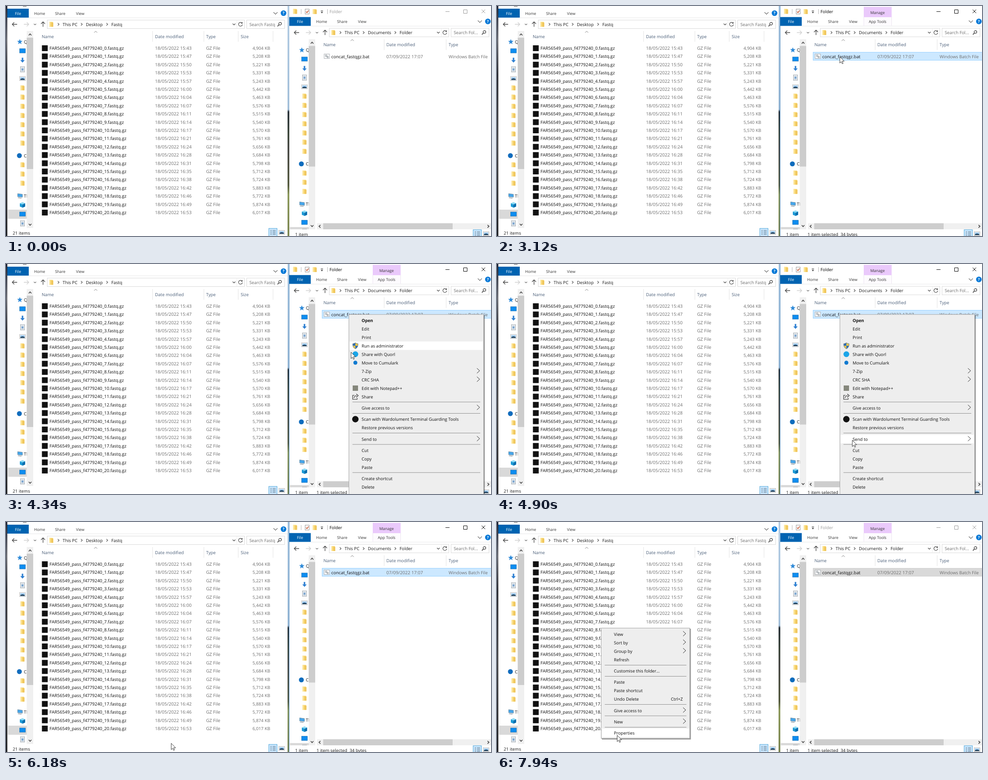
Animation of 1087x515 px, one loop 8000 ms. Source, as an HTML page:

```html
<!DOCTYPE html>
<html lang="en">
<head>
<meta charset="utf-8">
<title>Concatenate files</title>
<style>
html, body { margin: 0; width: 100%; height: 100%; overflow: hidden; background: #fff; }
svg { display: block; width: 100vw; height: 100vh; }
text { font: 9.75px "Open Sans", "Noto Sans", sans-serif; fill: #1a1a1a; white-space: pre; text-rendering: geometricPrecision; }
.tab { font-size: 8.7px; fill: #333; }
.tab.on { fill: #fff; }
.head { fill: #4c607a; }
.file { font-size: 9.9px; fill: #111; }
.num { font-size: 10.1px; fill: #6d6d6d; }
.dim { fill: #6d6d6d; }
.item { font-size: 9.6px; fill: #111; }
.bold { font-weight: 700; }
.mid { text-anchor: middle; }
.end { text-anchor: end; }
.title text { fill: currentColor; font-size: 9.6px; }
.line { fill: none; stroke: #444; stroke-width: 1.2; }

.title, .hover, .picked, .stale, .extra, .edge, .rowhover, .bar1, .bar2, .show {
  animation: 8s step-end infinite;
}
.title { animation-name: title; }
.hover { animation-name: hover; }
.picked { animation-name: picked; }
.stale { animation-name: stale; }
.extra { animation-name: extra; }
.edge { animation-name: edge; }
.rowhover { animation-name: rowhover; }
.bar1 { animation-name: bar1; }
.bar2 { animation-name: bar2; }
.show { animation-name: show; }
.menu1 { animation: menu1 8s linear infinite; }
.menu2 { animation: menu2 8s linear infinite; }
.cursor { animation: move 8s linear infinite; }

@keyframes title { 0% { color: #9a9a9a } 33.875% { color: #000 } 85%, 100% { color: #9a9a9a } }
@keyframes hover { 0% { opacity: 0 } 26.25% { opacity: 1 } 32.125%, 100% { opacity: 0 } }
@keyframes picked { 0% { opacity: 0 } 32.125% { opacity: 1 } 85%, 100% { opacity: 0 } }
@keyframes stale { 0% { opacity: 0 } 85%, 100% { opacity: 1 } }
@keyframes extra { 0% { opacity: 0 } 32.125%, 100% { opacity: 1 } }
@keyframes edge { 0% { opacity: 0 } 33.875% { opacity: 1 } 85%, 100% { opacity: 0 } }
@keyframes rowhover { 0% { opacity: 0 } 74.74% { opacity: 1 } 75.58%, 100% { opacity: 0 } }
@keyframes show { 0% { opacity: 0 } 11.5%, 100% { opacity: 1 } }
@keyframes menu1 {
  0% { opacity: 0 }
  40.6% { opacity: 0; animation-timing-function: steps(5) }
  45.75% { opacity: 1 }
  72.24% { opacity: 1 }
  72.25%, 100% { opacity: 0 }
}
@keyframes menu2 {
  0% { opacity: 0 }
  88.375% { opacity: 0; animation-timing-function: steps(5) }
  93.375%, 100% { opacity: 1 }
}
/* highlighted entry, as the centre of its row */
@keyframes bar1 {
  0% { transform: translateY(-99px) }
  51.62% { transform: translateY(126.5px) }
  52.5% { transform: translateY(145.5px) }
  53.37% { transform: translateY(164.5px) }
  54.24% { transform: translateY(183px) }
  55.12% { transform: translateY(202px) }
  56% { transform: translateY(221px) }
  56.87% { transform: translateY(240px) }
  57.75% { transform: translateY(278px) }
  58.62% { transform: translateY(297px) }
  59.5% { transform: translateY(322px) }
  60.37% { transform: translateY(366.5px) }
  61.24% { transform: translateY(392px) }
  63% { transform: translateY(417.5px) }
  63.87%, 100% { transform: translateY(436px) }
}
@keyframes bar2 { 0% { opacity: 0 } 98.36%, 100% { opacity: 1 } }
@keyframes move {
  0% { transform: translate(987px, 503px) }
  11.5% { transform: translate(987px, 503px); animation-timing-function: steps(5) }
  15.8% { transform: translate(855px, 310px); animation-timing-function: steps(5) }
  20.1% { transform: translate(787px, 196px); animation-timing-function: steps(1) }
  21% { transform: translate(783px, 179px); animation-timing-function: steps(4) }
  24.5% { transform: translate(774px, 130px); animation-timing-function: steps(3) }
  27.12% { transform: translate(768px, 113px) }
  49.87% { transform: translate(768px, 113px); animation-timing-function: steps(5) }
  54.24% { transform: translate(773px, 197px); animation-timing-function: steps(7) }
  60.37% { transform: translate(797px, 378px); animation-timing-function: steps(1) }
  61.24% { transform: translate(796px, 394px); animation-timing-function: steps(4) }
  64.74% { transform: translate(804px, 441px) }
  72.25% { transform: translate(804px, 441px); animation-timing-function: steps(6) }
  77.24% { transform: translate(370px, 495px); animation-timing-function: steps(5) }
  81.62% { transform: translate(248px, 495px); animation-timing-function: steps(1) }
  82.5% { transform: translate(233px, 484px) }
  97.5% { transform: translate(233px, 484px); animation-timing-function: steps(2) }
  99.24%, 100% { transform: translate(269px, 477px) }
}
</style>
</head>
<body>
<svg id="stage" viewBox="0 0 1087 515" preserveAspectRatio="none"></svg>
<script>
// Text is placed by the vertical centre of its capitals.
const text = (x, y, s, cls = '') => `<text x="${x}" y="${y + 3.5}" class="${cls}">${s}</text>`;
const rect = (x, y, w, h, fill, more = '') => `<rect x="${x}" y="${y}" width="${w}" height="${h}" fill="${fill}" ${more}/>`;
const path = (d, fill, more = '') => `<path d="${d}" fill="${fill}" ${more}/>`;
const line = (d, color = '#444', w = 1.2) => path(d, 'none', `stroke="${color}" stroke-width="${w}"`);
const dot = (r, fill) => `<circle r="${r}" fill="${fill}"/>`;
const at = (x, y, s, turn = 0) => `<g transform="translate(${x} ${y}) rotate(${turn})">${s}</g>`;

const icon = {
  folder: rect(-4.5, -5.5, 8, 11, '#f9d978') + path('M0 -4H4.5V5.5H0Z', '#f0c75e') + rect(-4.5, -5.5, 2, 11, '#fde9a6'),
  star: path('M0 -6L1.6 -2 6 -1.8 2.6 1 3.8 5.4 0 3 -3.8 5.4 -2.6 1 -6 -1.8 -1.6 -2Z', '#2f8ad8'),
  screen: rect(-6.5, -5, 13, 9.5, '#0d8df0', 'stroke="#1d6fae" stroke-width=".8"'),
  down: path('M-1.7 -5.5H1.7V0H5L0 5.5 -5 0H-1.7Z', '#2f80d2'),
  doc: rect(-4.5, -6, 9, 12, '#fff', 'stroke="#8b949c" stroke-width=".9"') + line('M-3 -3H3M-3 3.5H3', '#7d99b5', 1) + rect(-2.5, -1.5, 5, 3.5, '#6d9bc9'),
  photo: rect(-6.5, -4.5, 13, 9, '#fff', 'stroke="#a5a5a5" stroke-width=".8"') + rect(-5, -3, 10, 6, '#9fcbf0') + path('M-5 3V1L0 -.5 5 1V3Z', '#1e3f5a'),
  cube: path('M0 -6L6 -3.5V3.5L0 6 -6 3.5V-3.5Z', '#1c9ad6') + path('M0 -6L6 -3.5 0 -1 -6 -3.5Z', '#8fdcf5') + path('M0 -1L6 -3.5V3.5L0 6Z', '#0f6fae'),
  pc: path('M-5 -5L6 -3.5V3L-5 2Z', '#45a5ea', 'stroke="#7c8d99" stroke-width=".8"') + path('M-3 3.5L5 4.5 3 6 -5 5Z', '#9aa5ad'),
  cloud: dot(5.5, '#0f6cbd'),
  arrow: line('M-5.5 0H5.5M-1 -4.5L-5.5 0 -1 4.5', 'currentColor', 1.3),
  chev: line('M-2 -3.5L1.8 0 -2 3.5'),
  find: line('M-.8 .8L-4.5 4.5', '#333', 1.6) + `<circle cx="1.3" cy="-1.3" r="3" class="line" style="stroke:#333"/>`,
  reload: line('M3 -3.2A4.3 4.3 0 1 0 4.3 .5M4 -5V-2H1', '#444', 1.2),
  help: dot(6.3, '#0078d7') + `<text class="mid bold" y="3.4" style="fill:#fff;font-size:9px">?</text>`,
  gears: rect(-6, -5, 12, 10, '#fff', 'stroke="#a0a5aa" stroke-width=".9"') + `<circle cx="-1.5" cy="-1" r="1.8" class="line" style="stroke:#8c949a"/><circle cx="2" cy="1.8" r="1.5" class="line" style="stroke:#8c949a"/>`,
  zip: rect(-6.5, -6.5, 13, 13, '#111'),
  shield: path('M0 -6.5Q3 -4.5 6 -4.5 6.5 3.5 0 7Z', '#f3c84a') + path('M0 -6.5Q-3 -4.5 -6 -4.5 -6.5 3.5 0 7Z', '#2e6fb7') + path('M0 0H5.8Q4.8 4.5 0 7Z', '#2e6fb7') + path('M0 0H-5.8Q-4.8 4.5 0 7Z', '#f3c84a') + path('M0 -6.5Q3 -4.5 6 -4.5 6.5 3.5 0 7 -6.5 3.5 -6 -4.5 -3 -4.5 0 -6.5Z', 'none', 'stroke="#6b7a86" stroke-width="1"'),
  share: line('M-2 -3H-6V6H4V3M-3 3Q-2 -2 3 -2.5M2 -6L6.5 -2.5 2 1.5', '#222', 1.1)
};

// k moves what hangs on the right edge, b what hangs on the bottom edge.
function pane({ k, b, crumbs, find, cols, rules, thumb, chosen }) {
  let s = rect(3, 0, 628 + k, 520, '#fff');

  s += rect(3, 6, 48, 20, '#0063b1') + text(20, 16, 'File', 'tab on');
  s += text(63, 16, 'Home', 'tab') + text(110, 16, 'Share', 'tab') + text(157, 16, 'View', 'tab');
  s += line(`M51 26.5H${631 + k}`, '#e6e7e8', 1);
  s += at(604 + k, 16, line('M-4.5 -2L0 2.5 4.5 -2', '#666', 1.1)) + at(622 + k, 16, icon.help);

  s += `<g color="#444">${at(19.5, 41, icon.arrow)}${at(83, 41, icon.arrow, 90)}</g>`;
  s += `<g color="#d0d0d0">${at(45.5, 41, icon.arrow, 180)}</g>`;
  s += at(65, 41, line('M-2.5 -1.2L0 1.3 2.5 -1.2', '#555', 1.1));
  s += rect(92.5, 31.5, 442 + k, 19, '#fff', 'stroke="#d9d9d9"') + line(`M517.5 31.5V50.5`.replace('517.5', 517.5 + k), '#ececec', 1);
  s += at(101.5, 41, icon.folder);
  crumbs.forEach(([x, name]) => s += at(x - 9.5, 41, at(0, 0, line('M-1.5 -2.8L1.5 0 -1.5 2.8', '#444', 1.1))) + text(x, 41, name));
  s += at(511 + k, 41, line('M-3 -1.5L0 1.5 3 -1.5', '#444', 1.2)) + at(525.5 + k, 41, icon.reload);
  s += rect(539.5 + k, 31.5, 85, 19, '#fff', 'stroke="#d9d9d9"') + text(545.5 + k, 41, find, 'dim') + at(613 + k, 41, icon.find);

  s += rect(4, chosen, 43, 20.5, '#d9d9d9');
  const tree = ['star', 'screen', 'down', 'doc', 'photo'];
  tree.forEach((n, i) => s += at(i ? 37 : 31, 80 + 20.6 * i, icon[n]));
  for (let i = 0; i < 7; i++) s += at(37, 183.3 + 20.6 * i, icon.folder);
  s += at(30, 335, icon.cloud);
  for (let i = 0; i < 3; i++) s += at(37, 355.5 + 20.6 * i, icon.folder);
  ['pc', 'cube', 'screen', 'doc'].forEach((n, i) => s += at(i ? 37 : 31, 425 + 20.6 * i, icon[n]));
  s += text(40, 80, 'Q') + text(40, 335, 'C') + text(40, 425, 'Th');

  s += rect(46.5, 56, 14.5, 441 + b, '#f0f0f0') + rect(46.5, 71, 14.5, thumb, '#cdcdcd');
  s += at(54, 64, line('M-3 1.8L0 -1.5 3 1.8', '#444', 1.6)) + at(54, 489.5 + b, line('M-3 -1.8L0 1.5 3 -1.8', '#444', 1.6));

  cols.forEach(([x, name]) => s += text(x, 68, name, 'head'));
  s += line(rules.map(x => `M${x} 56V80`).join(''), '#e3e3e3', 1);
  s += at(cols[0][2], 58, line('M-3.5 1.5L0 -1.5 3.5 1.5', '#777', .9));

  s += rect(4, 497 + b, 627 + k, 30, '#fff');
  s += rect(589 + k, 498 + b, 18.5, 19, '#cce8ff', 'stroke="#4aa3d8"');
  for (let i = 0; i < 4; i++) s += line(`M${592.5 + k} ${502.5 + b + 3 * i}h3m2 0h7`, '#4f6b80', 1);
  return s + at(618 + k, 507 + b, icon.photo);
}

function wallpaper() {
  const stops = (id, list) => `<linearGradient id="${id}" x2="0" y2="1">${list.map(([o, c]) => `<stop offset="${o}" stop-color="${c}"/>`).join('')}</linearGradient>`;
  return `<defs>${stops('rock', [[0, '#1d2233'], [.15, '#6d6f76'], [.3, '#2a2b31'], [.6, '#4a4a4c'], [1, '#1f2023']])}
    ${stops('land', [[0, '#b4cde4'], [.45, '#a3bfd9'], [.46, '#2c353c'], [.56, '#414b3f'], [.62, '#4a4a48'], [.78, '#575d42'], [.82, '#8d9a5c'], [1, '#7c8652']])}</defs>`
    + rect(0, 0, 4, 515, 'url(#rock)') + rect(630, 0, 6, 515, 'url(#land)');
}

function leftFiles() {
  const mins = [43, 47, 50, 53, 57, 60, 64, 67, 71, 74, 77, 81, 84, 88, 91, 95, 98, 102, 106, 109, 113];
  const sizes = [4904, 5208, 5221, 5331, 5243, 5442, 5463, 5576, 5515, 5540, 5570, 5761, 5656, 5684, 5798, 5712, 5724, 5883, 5772, 5874, 6017];
  return rect(77, 453.5, 521, 18, '#e5f3ff', 'class="rowhover"') + mins.map((m, i) => {
    const y = 94.5 + 18.4 * i;
    const clock = `${15 + Math.floor(m / 60)}:${String(m % 60).padStart(2, '0')}`;
    return at(87, y, icon.zip) + text(97.5, y, `FAR56549_pass_f4779240_${i}.fastq.gz`, 'file')
      + text(334, y, `18/05/2022 ${clock}`, 'num') + text(448.5, y, 'GZ File', 'num')
      + text(592, y, `${sizes[i].toLocaleString('en-GB')} KB`, 'dim end');
  }).join('');
}

function rightParts() {
  const row = (cls, fill, edge) => rect(708.5, 103.5, 382, 18, fill, `class="${cls}" stroke="${edge}"`);
  let s = row('hover', '#e5f3ff', '#e5f3ff') + row('picked', '#cce8ff', '#99d1ff') + row('stale', '#d9d9d9', '#d0d0d0');
  s += at(719, 112.5, icon.gears) + text(729, 113, 'concat_fastqgz.bat', 'file') + text(852.5, 113, '07/09/2022 17:07', 'num') + text(992, 113, 'Windows Batch File', 'dim');

  s += rect(697, 486.5, 390, 13.5, '#f0f0f0') + rect(711, 486.5, 290, 13.5, '#cdcdcd');
  s += at(703, 493.3, line('M1.8 -3L-1.5 0 1.8 3', '#444', 1.6)) + at(1081, 493.3, line('M-1.8 -3L1.5 0 -1.8 3', '#444', 1.6));
  s += text(648, 511, '1 item') + `<g class="extra">${text(696, 511, '1 item selected')}${text(770, 511, '34 bytes')}</g>`;

  s += at(648, 12, icon.folder) + at(692, 12.5, icon.folder) + line('M661.5 7V18M720.5 7V18', '#b5b5b5', 1);
  s += at(675, 12.5, rect(-4.5, -5.5, 9, 11, '#fff', 'stroke="#8a8a8a" stroke-width=".9"') + line('M-2.5 0L-.5 2.5 3 -2.5', '#c4502a', 1.4));
  s += at(708, 13, line('M-2.5 -2H2.5', '#222', 1.1) + path('M-2.5 0.5H2.5L0 3.2Z', '#222'));
  s += `<g class="title">${text(725, 12, 'Folder')}${line('M985 12.5H994M1025.5 8.5H1033.5V16.5H1025.5ZM1066 8L1074 16M1074 8L1066 16', 'currentColor', 1)}</g>`;
  s += `<g class="extra">${rect(822, 2, 62.5, 23, '#eac9fb')}${rect(822, 25, 62.5, 19, '#fdfbfe')}${line('M822 25V44M884.5 25V44', '#ece4f0', 1)}
    ${text(853, 14.5, 'Manage', 'tab mid')}${text(853, 34.5, 'App Tools', 'tab mid')}</g>`;
  return s + line('M634.5 0V515', '#3f7fb8', 1).replace('<path', '<path class="edge"');
}

function menu(cls, [x, y, w, h], bar, items, rules) {
  let s = rect(x + 2, y + 2, w, h, '#000', 'opacity=".4"') + rect(x + .5, y + .5, w - 1, h - 1, '#eee', 'stroke="#a3a3a3"') + bar;
  s += line(rules.map(r => `M${x + 8.5} ${r}H${x + w - 8}`).join(''), '#8f8f8f', 1);
  for (const [cy, name, opt = {}] of items) {
    s += text(x + 29, cy, name, 'item ' + (opt.cls || ''));
    if (opt.more) s += at(x + w - 12.5, cy - 1, line('M-3 -5.5L3 0 -3 5.5', '#222', 1));
    if (opt.key) s += text(x + w - 16, cy, opt.key, 'item end');
    if (opt.icon) s += at(x + 15, cy, opt.icon);
  }
  return `<g class="${cls}">${s}</g>`;
}

const more = { more: true };
const fileMenu = menu('menu1', [768, 112.5, 303, 420], rect(770, -9.5, 299, 19, '#fff', 'class="bar1"'), [
  [126.5, 'Open', { cls: 'bold' }], [145.5, 'Edit'], [164.5, 'Print'],
  [183, 'Run as administrator', { icon: icon.shield }],
  [202, 'Share with Quorl', { icon: dot(6.5, '#1ba5e8') }],
  [221, 'Move to Cumulark', { icon: dot(4.5, '#0f7ad0') }],
  [240, '7-Zip', more], [259, 'CRC SHA', more],
  [278, 'Edit with Notepad++', { icon: rect(-6, -6, 12, 12, '#85877c') }],
  [297, 'Share', { icon: icon.share }],
  [322, 'Give access to', more],
  [347.5, 'Scan with Wardolument Terminal Guarding Tools', { icon: dot(7.2, '#111') }],
  [366.5, 'Restore previous versions'], [392, 'Send to', more],
  [417.5, 'Cut'], [436, 'Copy'], [455, 'Paste'],
  [480, 'Create shortcut'], [499, 'Delete'], [518, 'Rename']
], [309, 334.5, 378.5, 404, 467]);

const folderMenu = menu('menu2', [233, 237, 199.5, 248], rect(235, 462.5, 196, 19, '#fff', 'class="bar2"'), [
  [251, 'View', more], [270, 'Sort by', more], [289, 'Group by', more], [308, 'Refresh'],
  [333.5, 'Customise this folder...'], [358.5, 'Paste'], [377.5, 'Paste shortcut'],
  [396.5, 'Undo Delete', { key: 'Ctrl+Z' }], [422, 'Give access to', more], [447, 'New', more], [472.5, 'Properties']
], [320.5, 345.5, 408.5, 434, 459.5]);

const left = pane({
  k: 0, b: 0, find: 'Search Fastq', thumb: 294, chosen: 456, rules: [328.5, 443.5, 520.5, 598.5],
  crumbs: [[127, 'This PC'], [179, 'Desktop'], [236, 'Fastq']],
  cols: [[80, 'Name', 201], [334, 'Date modified'], [448.5, 'Type'], [526, 'Size']]
});
const right = pane({
  k: -174, b: -15.5, find: 'Search Fol...', thumb: 270, chosen: 476.5, rules: [215.5, 354.5],
  crumbs: [[127, 'This PC'], [179, 'Documents'], [250, 'Folder']],
  cols: [[79.5, 'Name', 144], [220.5, 'Date modified'], [360, 'Type']]
});
const cursor = `<g class="cursor"><g class="show">${path('M.3 .5V14.8L3.5 11.7 5.7 16.4 7.8 15.4 5.7 10.7H10.2Z', '#fff', 'stroke="#222" stroke-width=".9"')}</g></g>`;

document.getElementById('stage').innerHTML = wallpaper()
  + left + rect(38, 0, 8, 1, '#555') + leftFiles() + text(15, 508, '21 items')
  + at(632, 18.5, right) + rect(635, 0, 452, 24.5, '#fff') + rightParts()
  + fileMenu + folderMenu + cursor;
</script>
</body>
</html>
```
